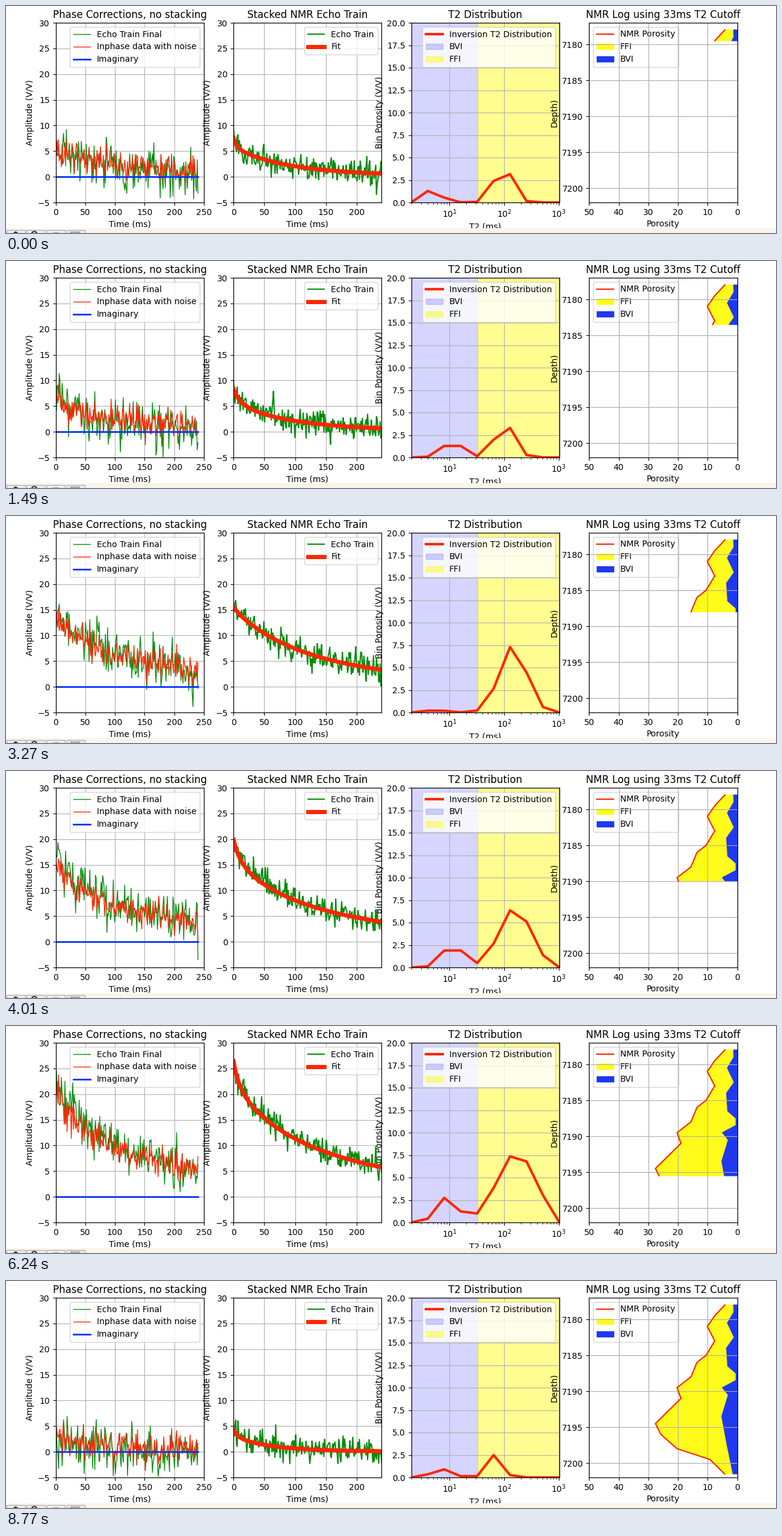
Write a matplotlib script that moves like this. It is 1280 px wide and 379 px high and loops after 9220 ms.

```python
import numpy as np
import matplotlib.pyplot as plt
from matplotlib.animation import FuncAnimation
from matplotlib.patches import Circle, Polygon, Rectangle
from matplotlib.transforms import Affine2D

W, H, DPI = 1280, 379, 100
LOOP_MS = 9220
SLOTS, SUB = 62, 3          # playback slots per loop, drawn frames per slot
FRAMES = SLOTS * SUB

GREEN, RED, BLUE, YELLOW = "#088c0c", "#ff2600", "#0433ff", "#fffb1a"
GRID = "#b0b0b0"

FIRST, LAST = 3, 47         # depth indices at the start and end of the loop
RATE = 0.745                # depths logged per slot
CURSOR_INDEX = 16           # the mouse pointer passes by at this depth

DEPTH = 7178 + 0.5 * np.arange(LAST + 1)
TIME = np.linspace(0, 240, 201)
BINS = np.arange(1, 11)     # log2 of T2
T2 = 2.0 ** BINS


def curve(*points):
    """Log values at every depth from a few (depth, value) turning points."""
    return np.interp(DEPTH, *zip(*points))


POROSITY = curve((7178, 4.2), (7179.5, 7.6), (7181, 10.1), (7183, 7.6),
                 (7185, 10.5), (7186, 13.6), (7188, 15.6), (7189.5, 20.3),
                 (7191, 19), (7194.5, 27.6), (7196, 25.8), (7198, 20.3),
                 (7199.5, 9.2), (7201.5, 4.3))
BOUND = curve((7178, 1.2), (7179, 1.1), (7180.5, 3.3), (7182.5, 1),
              (7184, 3.6), (7186.5, 3.2), (7187.5, 0.4), (7188.5, 0.4),
              (7189.5, 5), (7190.5, 3), (7193.5, 5.2), (7197.5, 3.4),
              (7201.5, 1.4))


def hump(center, width, total):
    """Bell over the inner T2 bins with the given sum."""
    bell = np.exp(-0.5 * ((BINS - center) / width) ** 2)
    bell[[0, -1]] = 0
    return total * bell / bell.sum()


def spectrum(i):
    """Bound and free fluid humps; free pores widen with porosity."""
    por, bound = POROSITY[i], BOUND[i]
    bound_center = 2.75 + 0.75 * np.cos(2 * np.pi * (i - 24) / 13)
    free_center = 6 + 1.45 * (1 - np.exp(-(por - 4) / 7))
    return (hump(bound_center, 0.6, bound)
            + hump(free_center, 0.3 + 0.033 * por, por - bound))


def decay(amps):
    return np.exp(-TIME[:, None] / T2) @ amps


def band(left, right, depth):
    """Closed outline between two curves running down the depth axis."""
    return np.column_stack([np.r_[left, right[::-1]], np.r_[depth, depth[::-1]]])


fig = plt.figure(figsize=(W / DPI, H / DPI), dpi=DPI, facecolor="white")
pixels = Affine2D().scale(1, -1).translate(0, H)    # y measured from the top


def panel(col, title, xlabel, ylabel, xlim, ylim):
    ax = fig.add_axes([(82.6 + 295.55 * col) / W, 51 / H, 246.3 / W, 300 / H])
    ax.set(title=title, xlabel=xlabel, ylabel=ylabel, xlim=xlim, ylim=ylim)
    ax.grid(True)
    return ax


def stamp(patch, zorder=5):
    patch.set_transform(pixels)
    patch.set_zorder(zorder)
    return fig.add_artist(patch)


# Raw echo train
raw = panel(0, "Phase Corrections, no stacking", "Time (ms)",
            "Amplitude (V/V)", (0, 250), (-5, 30))
final_line, = raw.plot([], [], color=GREEN, lw=1, label="Echo Train Final")
inphase_line, = raw.plot([], [], color=RED, lw=1, label="Inphase data with noise")
imag_line, = raw.plot(TIME, 0 * TIME, color=BLUE, lw=2, label="Imaginary")
raw.legend(loc="upper right")

# Stacked echo train with fit
stack = panel(1, "Stacked NMR Echo Train", "Time (ms)",
              "Amplitude (V/V)", (0, 240), (-5, 30))
echo_line, = stack.plot([], [], color=GREEN, lw=1.5, label="Echo Train")
fit_line, = stack.plot([], [], color=RED, lw=5, label="Fit")
stack.legend(loc="upper right")

# T2 distribution
dist = panel(2, "T2 Distribution", "T2 (ms)", "Bin Porosity (V/V)",
             (2, 1024), (0, 20))
dist.set_xscale("log")
dist.set_xlim(2, 1024)
t2_line, = dist.plot([], [], color=RED, lw=3, label="Inversion T2 Distribution")
dist.axvspan(2, 33, color="#0000ff", alpha=0.165, label="BVI")
dist.axvspan(33, 1024, color="#fffb00", alpha=0.44, label="FFI")
dist.legend(loc="upper right")

# Porosity log, with its grid above the filled areas
log = panel(3, "NMR Log using 33ms T2 Cutoff", "Porosity", "Depth)",
            (50, 0), (7202, 7177))
por_line, = log.plot([], [], color=RED, lw=1.5, label="NMR Porosity", zorder=3)
ffi_area, = log.fill([0], [7178], color=YELLOW, label="FFI")
bvi_area, = log.fill([0], [7178], color="#1f38f0", label="BVI")
log.legend(loc="upper left")
style = dict(color=GRID, lw=0.8, zorder=1.5)
log_grid = [log.axvline(x, **style) for x in range(10, 50, 10)]
log_grid += [log.axhline(y, **style) for y in range(7180, 7202, 5)]

# Top edge of the window's toolbar
stamp(Rectangle((0, 371), W, 10, fc="#faf4ea", lw=0))
for x in (1, 34, 67.5, 100.5):
    stamp(Rectangle((x, 373.5), 30.5, 10, fc="#ececec", ec="#a9a9a9", lw=0.8))
stamp(Polygon([(10, 380), (16, 376), (22, 380)], fc="#333333", lw=0))
stamp(Circle((47, 381), 4.5, fc="none", ec="#333333", lw=1.5))
stamp(Rectangle((78, 378), 10, 3, fc="#999999", lw=0))
stamp(Rectangle((107, 376.5), 15, 6, fc="#dddddd", ec="#888888", lw=1))

arrow = np.array([(0, 0), (0, 14), (3.2, 11), (5.6, 16.2), (7.8, 15.2),
                  (5.4, 10.2), (9.6, 10)])
cursor = stamp(Polygon(arrow + (1157, 226), fc="black", ec="white", lw=0.7),
               zorder=6)

# Render the static parts once; only the live artists are redrawn per frame.
panels = (raw, stack, dist, log)
live = [final_line, inphase_line, imag_line, echo_line, fit_line, t2_line,
        por_line, ffi_area, bvi_area, *log_grid]
for artist in live + [cursor]:
    artist.set_visible(False)
fig.canvas.draw()
backdrop = np.array(fig.canvas.buffer_rgba())
for ax in panels:
    live += ax.spines.values()
    for child in ax.get_children():
        child.set_visible(child in live)
fig.figimage(backdrop, zorder=-1)


def update(frame):
    slot = (frame + 1) // SUB
    i = min(FIRST + int(np.ceil(RATE * slot)), LAST)
    rng = np.random.default_rng(100 + i)
    amps = spectrum(i)
    signal = decay(amps)

    shared, extra, stacked = rng.normal(size=(3, len(TIME)))
    inphase_line.set_data(TIME, 0.8 * signal + 0.7 + 1.5 * shared)
    final_line.set_data(TIME, 0.92 * signal + 1.4 * shared + 1.8 * extra)
    echo_line.set_data(TIME, signal + 1.3 * stacked)
    fit_line.set_data(TIME, signal)
    t2_line.set_data(T2, amps)

    depth, por, bvi = DEPTH[:i + 1], POROSITY[:i + 1], BOUND[:i + 1]
    por_line.set_data(por, depth)
    ffi_area.set_xy(band(por, bvi, depth))
    bvi_area.set_xy(band(bvi, 0 * bvi, depth))
    cursor.set_visible(i == CURSOR_INDEX)
    return live + [cursor]


anim = FuncAnimation(fig, update, frames=FRAMES, interval=LOOP_MS / FRAMES,
                     repeat=True, repeat_delay=0, cache_frame_data=False)
plt.show()
```
